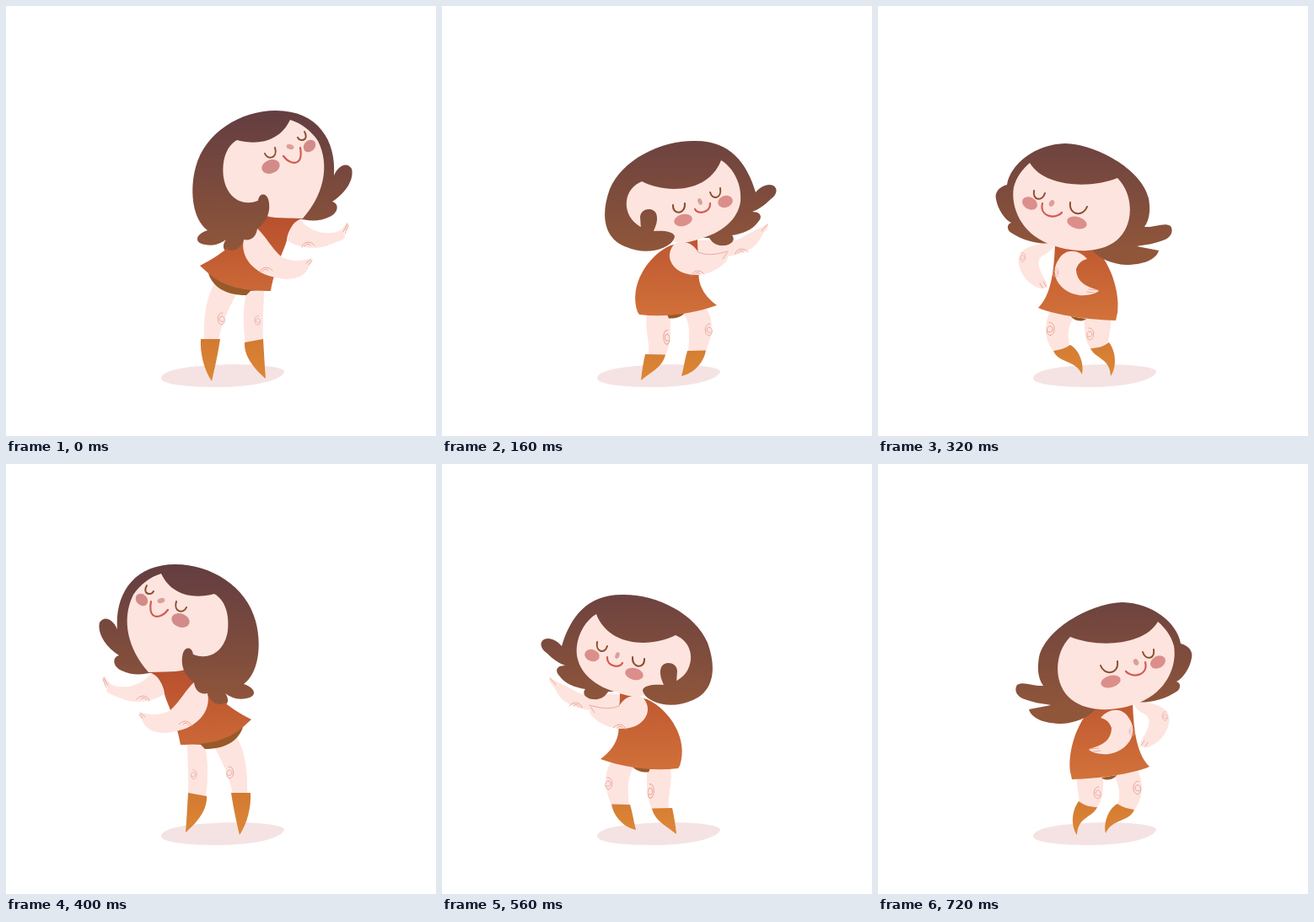
An HTML page for the animation above (0.8 s loop, 510 px wide and 510 px high).

```html
<!DOCTYPE html>
<html lang="en">
<head>
<meta charset="utf-8">
<title>Dancing girl</title>
<style>
html, body { margin: 0; width: 100%; height: 100%; overflow: hidden; background: #fff; }
svg { display: block; width: 100vw; height: 100vh; }
.hair { fill: url(#hair); }
.dress { fill: url(#dress); }
.boot { fill: url(#boot); }
.skin { fill: #fee4de; }
.pants { fill: #985a2a; }
.cheek { fill: var(--cheek, #dc8e8b); }
.nose { fill: #d9a198; }
.eye, .mouth, .line { fill: none; stroke-linecap: round; }
.eye { stroke: #8a5030; stroke-width: 2; }
.mouth { stroke: #d25a54; stroke-width: 2.2; }
.line { stroke: #e5a398; stroke-width: .9; }
.step { visibility: hidden; animation: show .8s step-end infinite; animation-delay: calc(var(--i) * 80ms - 800ms); }
@keyframes show { 0% { visibility: visible; } 10%, 100% { visibility: hidden; } }
</style>
</head>
<body>
<svg viewBox="0 0 510 510">
<defs>
  <linearGradient id="hair" gradientUnits="userSpaceOnUse" x1="0" y1="122" x2="0" y2="292">
    <stop stop-color="#633d41"/><stop offset="1" stop-color="#90563a"/>
  </linearGradient>
  <linearGradient id="dress" gradientUnits="userSpaceOnUse" x1="0" y1="250" x2="0" y2="385">
    <stop stop-color="#b8502e"/><stop offset="1" stop-color="#d5753b"/>
  </linearGradient>
  <linearGradient id="boot" gradientUnits="userSpaceOnUse" x1="0" y1="392" x2="0" y2="444">
    <stop stop-color="#d17931"/><stop offset="1" stop-color="#de8736"/>
  </linearGradient>
  <path id="knee" class="line" d="M2-7C-5-8-6 6 1 7C6 5 5-4 0-3C-4 0-1 5 3 3"/>
  <path id="elbow" class="line" d="M-6 3C-5-4 5-5 9 1M-3 2C-1-2 3-1 4 1"/>

  <g id="stretch" style="--cheek:#d28b88">
    <path class="skin" d="M249 326C237 345 234 370 235 398L252 398C255 375 268 352 274 340ZM285 340C281 358 281 378 284 401L305 398C304 375 306 352 306 336Z"/>
    <path class="boot" d="M231 395L254 395C251 415 247 432 244 445C235 432 230 412 231 395ZM283 399L305 395C306 412 307 430 308 442C294 430 282 415 283 399Z"/>
    <path class="pants" d="M240 317C245 333 260 343 285 343L290 338L314 336Z"/>
    <path class="hair" d="M320 124C370 124 392 160 389 201C394 189 404 184 410 193C413 205 404 221 387 232C395 234 395 245 384 250C370 257 356 254 345 252L300 258L282 277L298 264C296 274 290 279 282 277C281 284 277 291 267 292C258 293 255 285 261 277C254 282 247 285 236 283C223 281 224 271 239 266C220 252 218 216 225 191C236 150 278 124 320 124Z"/>
    <path class="skin" d="M274 159C260 167 256 185 258 203C262 228 280 238 299 231L309 251L352 252C376 225 385 190 370 160C361 147 350 139 337 135C325 160 300 166 274 159Z"/>
    <path class="dress" d="M306 248C320 253 338 252 350 252C340 258 334 267 333 278C329 292 319 309 314 338C287 338 260 335 240 317L230 308C250 298 268 285 294 258Z"/>
    <path class="skin" d="M349 253C340 256 335 266 334 278C345 287 370 290 384 283C395 279 402 277 402 273L400 268C406 264 408 260 404 257C400 264 395 269 386 269C370 271 355 262 349 253ZM282 277C277 298 295 318 320 322C340 327 356 322 360 307C363 304 364 300 360 300C350 303 335 303 326 297C316 288 307 272 298 264Z"/>
    <path class="hair" d="M299 231C300 222 308 221 311 229C315 243 309 257 298 264C297 274 290 279 282 277C278 292 262 293 260 285L262 270L290 234Z"/>
    <path class="line" d="M400 268L405 258M402 270L406 260M356 305L362 300M359 307L363 302"/>
    <use href="#elbow" x="357" y="283"/><use href="#elbow" x="307" y="313"/>
    <use href="#knee" x="255" y="371"/><use href="#knee" transform="translate(298 373) scale(.8)"/>
    <path class="eye" d="M307 175C310 183 323 181 319 168M346 156C349 162 360 159 354 149"/>
    <path class="mouth" d="M329 178C337 189 353 191 349 168"/>
    <ellipse class="nose" rx="4.5" ry="3" transform="translate(337 167) rotate(20)"/>
    <ellipse class="cheek" rx="11" ry="8" transform="translate(314 190.5) rotate(-20)"/>
    <ellipse class="cheek" rx="8" ry="6.5" transform="translate(360 166) rotate(-45)"/>
  </g>

  <g id="fall">
    <path class="skin" d="M246 344C239 364 240 384 240 405L258 405C262 385 268 366 272 352ZM285 352C288 372 286 386 288 405L308 403C313 380 314 362 309 346Z"/>
    <path class="boot" d="M236 405L259 404C257 422 247 434 240 445C236 433 233 420 236 405ZM287 405L309 402C309 419 304 432 297 441C289 431 284 418 287 405Z"/>
    <path class="pants" d="M250 345C256 357 276 358 290 353L312 348Z"/>
    <path class="dress" d="M300 264L345 262C334 270 322 292 315 312C313 327 316 338 320 346C295 354 258 352 232 341C235 314 260 284 284 270Z"/>
    <path class="skin" d="M334 264C322 270 318 282 319 286C340 295 366 292 382 281C392 275 398 269 399 261C390 268 378 270 368 271C354 272 345 267 334 264Z"/>
    <path class="hair" d="M312 139C358 140 378 178 382 208C394 196 414 190 421 197C427 206 410 220 391 230C399 234 398 244 388 251C374 261 354 264 340 263L285 274C275 292 246 295 230 284C208 270 200 240 210 209C226 168 270 139 312 139Z"/>
    <path class="skin" d="M254 184C238 195 234 215 240 230C246 244 256 250 268 249L292 264C315 272 335 270 344 262C370 238 375 205 357 178C351 169 343 163 335 160C322 194 280 198 254 184Z"/>
    <path class="hair" d="M266 250C267 236 284 229 290 240C294 252 288 260 283 264C289 266 292 271 286 276C276 287 259 288 245 280L240 250Z"/>
    <path class="skin" d="M284 272C270 286 276 308 299 317C322 325 344 317 350 301L351 295C338 298 325 298 315 293C306 279 294 266 284 272Z"/>
    <path class="line" d="M390 270L398 263M345 302L351 296"/>
    <use href="#elbow" x="353" y="286"/><use href="#elbow" x="304" y="315"/>
    <use href="#knee" x="257" y="383"/><use href="#knee" x="304" y="379"/>
    <path class="eye" d="M291 204C290 215 304 215 304 202M332 188C334 198 345 195 342 182"/>
    <path class="mouth" d="M315 211C320 220 336 218 334 202"/>
    <ellipse class="nose" rx="3" ry="4" transform="translate(322 200) rotate(-25)"/>
    <ellipse class="cheek" rx="11" ry="7.5" transform="translate(300 222) rotate(-18)"/>
    <ellipse class="cheek" rx="8.5" ry="7" transform="translate(349 199) rotate(-30)"/>
  </g>

  <g id="lean">
    <path class="skin" d="M243 365C240 385 247 398 245 415L265 415C272 398 272 380 270 365ZM286 364C296 378 293 395 292 411L312 411C320 395 324 373 313 358Z"/>
    <path class="boot" d="M241 413L265 413.5C262 428 248 434 236 444C237 433 239 422 241 413ZM291 409L313 408.5C310 425 297 436 284 439C287 428 288 418 291 409Z"/>
    <path class="pants" d="M267 366L269 370.5C276 371 284 369 288 364Z"/>
    <path class="dress" d="M271 284C244 296 221 332 232 363L234 366C268 370 300 364 326 355C312 345 302 330 305 312L303 277Z"/>
    <path class="skin" d="M303 278C322 275 342 285 358 273C370 266 380 263 386 258C389 262 382 267 378 275C372 288 355 295 338 297L304 293Z"/>
    <path class="hair" d="M301 160C342 160 362 187 372 221C378 214 386 210 393 213C399 217 397 224 390 229C382 237 374 242 368 244C379 244 380 251 375 256C368 266 356 270 344 272C348 276 345 283 335 284C325 285 320 280 317 275L276 275C268 291 239 295 219 286C193 277 187 250 199 217C214 182 260 159 301 160Z"/>
    <path class="skin" d="M237 208C218 216 215 236 223 250C228 259 240 266 251 267L273 279C285 282 295 280 303 277C334 269 351 252 354 232C356 212 346 192 331 183C316 222 266 223 237 208Z"/>
    <path class="hair" d="M236 265L235 250C236 240 250 238 254 246C257 254 253 262 251 267C262 266 274 267 276 273C275 284 255 291 236 289L222 260Z"/>
    <path class="skin" d="M276 282C266 292 268 308 285 316C303 323 325 317 338 302L340 292C325 295 312 295 304 292C297 280 285 277 276 282Z"/>
    <path class="line" d="M304 292C316 297 328 294 339 291M333 300L338 293M379 267L386 259"/>
    <use href="#elbow" x="302" y="317"/><use href="#elbow" x="354" y="291"/>
    <use href="#knee" transform="translate(266 393) scale(.9 1.2)"/><use href="#knee" x="316" y="384"/>
    <path class="eye" d="M274 236C273 248 289 248 288 234M318 221C321 231 332 228 330 216"/>
    <path class="mouth" d="M300 241C303 248 319 245 318 234"/>
    <ellipse class="nose" rx="2.5" ry="4" transform="translate(306 232) rotate(-20)"/>
    <ellipse class="cheek" rx="11" ry="7" transform="translate(286 254) rotate(-15)"/>
    <ellipse class="cheek" rx="9" ry="7" transform="translate(336 232) rotate(-20)"/>
  </g>

  <g id="squat">
    <path class="skin" d="M200 375C184 384 180 405 196 420L213 415C212 402 217 392 229 385ZM267 385C280 392 287 402 288 415L311 418C321 404 317 380 296 375Z"/>
    <path class="boot" d="M196 421C203 419 208 415 213 414C225 419 236 427 235 440C225 430 210 425 196 421ZM287 414L311 417C300 424 287 427 274 438C274 430 284 424 287 414Z"/>
    <path class="pants" d="M224 385C235 391 260 390 270 385Z"/>
    <path class="dress" d="M220 316L281 316L292 325C296 340 299 360 297 377C275 387 250 389 227 386C212 383 200 377 186 368C206 358 220 345 231 324Z"/>
    <path class="skin" d="M233 321C226 317 218 318 212 321C195 332 175 331 152 330C148 333 155 335 160 336C160 345 175 351 192 353C205 355 217 350 222 340C227 335 231 328 233 321ZM281 317C295 316 298 330 292 342C285 355 262 358 248 356C235 355 225 356 219 353C215 349 222 345 230 340C245 335 265 337 278 333C282 328 280 322 281 317Z"/>
    <path class="hair" d="M243 206C290 206 330 235 330 272C330 300 312 318 292 320L220 318C200 318 174 302 156 288C142 278 131 262 135 253C141 253 148 262 153 264C138 243 138 225 149 223C158 225 159 238 166 246C172 221 205 206 243 206Z"/>
    <path class="skin" d="M189 239C172 260 176 294 207 311C235 325 265 322 283 317L307 294C316 281 314 264 305 249C265 252 220 251 189 239Z"/>
    <path class="hair" d="M307 294C303 288 300 289 297 286C291 281 280 282 278 290C278 296 284 299 288 300C279 302 273 306 275 312C280 321 296 321 306 315L325 296L314 282Z"/>
    <path class="line" d="M152 331L160 334M219 349L228 346M219 353L228 351"/>
    <use href="#elbow" x="203" y="349"/><use href="#elbow" x="276" y="352"/>
    <use href="#knee" x="190" y="398"/><use href="#knee" transform="translate(308 398) scale(1.1)"/>
    <path class="eye" d="M208 273C208 286 225 287 224 272M261 274C260 289 277 290 278 275"/>
    <path class="mouth" d="M229 288C234 300 250 301 257 287"/>
    <ellipse class="nose" cx="243" cy="282" rx="2.5" ry="5"/>
    <ellipse class="cheek" rx="11.5" ry="6" transform="translate(209 290) rotate(5)"/>
    <path class="cheek" d="M281 290C270 287 262 290 262 295C264 301 276 301 285 299C279 297 277 293 281 290Z"/>
  </g>

  <g id="swing">
    <path class="skin" d="M236 372C235 385 240 394 238 402L259 409C266 400 268 385 267 371ZM279 369C287 380 288 395 284 405L303 411C314 400 316 378 308 364Z"/>
    <path class="boot" d="M238 400C245 405 252 407 260 407C254 420 237 418 236 440C229 430 229 412 238 400ZM284 403C290 407 297 409 304 410C298 425 278 420 270 438C267 425 274 408 284 403Z"/>
    <path class="pants" d="M265 372L283 369C280 375 268 376 265 372Z"/>
    <path class="dress" d="M250 293C234 312 225 343 228 365L230 374C262 373 300 368 322 359C308 345 303 320 302 281Z"/>
    <path class="hair" d="M290 164C325 165 355 188 359 213C368 215 374 222 372 230C370 242 362 254 354 258C360 260 359 267 354 270C342 278 325 283 310 283L257 292C248 301 235 307 218 308C198 308 182 302 179 291L205 286C195 284 188 284 177 280C164 277 161 268 165 262C172 257 185 264 196 263C189 253 189 241 191 229C200 193 255 165 290 164Z"/>
    <path class="skin" d="M228 205C208 225 208 262 229 279C250 296 285 293 310 283C342 270 355 240 351 216C348 204 341 195 332 187C315 216 260 218 228 205Z"/>
    <path class="skin" d="M303 284C312 280 335 284 343 294C351 308 338 330 320 336C313 337 309 334 313 327C319 318 325 305 319 299C314 294 307 294 303 284ZM266 299C275 290 290 288 298 302C309 318 298 338 278 343C268 346 255 343 250 339C252 337 258 336 262 334C272 330 277 322 277 313C274 305 270 303 264 301Z"/>
    <path class="line" d="M251 338L262 337M255 341L264 340M312 334L316 328M317 335L320 330"/>
    <use href="#knee" transform="translate(340 299) scale(.75)"/><use href="#knee" transform="translate(301 317) scale(.8)"/>
    <use href="#knee" x="260" y="390"/><use href="#knee" transform="translate(307 384) scale(1.1)"/>
    <path class="eye" d="M264 239C268 251 286 250 284 234M314 223C317 233 329 232 327 220"/>
    <path class="mouth" d="M294 246C300 254 321 252 317 235"/>
    <ellipse class="nose" rx="3" ry="4" transform="translate(306 235) rotate(-25)"/>
    <ellipse class="cheek" rx="12" ry="7" transform="translate(276 258) rotate(-15)"/>
    <ellipse class="cheek" rx="9.5" ry="7" transform="translate(332 235) rotate(-28)"/>
  </g>
</defs>

<path fill="#f5e3e4" d="M184 441C186 430 225 426 268 425C300 425 331 428 330 434C326 445 290 452 252 452C215 452 183 449 184 441Z"/>

<!-- the second half of the dance mirrors the first -->
<use class="step" style="--i:0" href="#stretch"/>
<use class="step" style="--i:1" href="#fall"/>
<use class="step" style="--i:2" href="#lean"/>
<use class="step" style="--i:3" href="#squat" transform="matrix(-1 0 0 1 513 0)"/>
<use class="step" style="--i:4" href="#swing" transform="matrix(-1 0 0 1 512 -1)"/>
<use class="step" style="--i:5" href="#stretch" transform="matrix(-1 0 0 1 521 -5)"/>
<use class="step" style="--i:6" href="#fall" transform="matrix(-1 0 0 1 521 -5)"/>
<use class="step" style="--i:7" href="#lean" transform="matrix(-1 0 0 1 514 -5)"/>
<use class="step" style="--i:8" href="#squat"/>
<use class="step" style="--i:9" href="#swing"/>
</svg>
</body>
</html>
```
